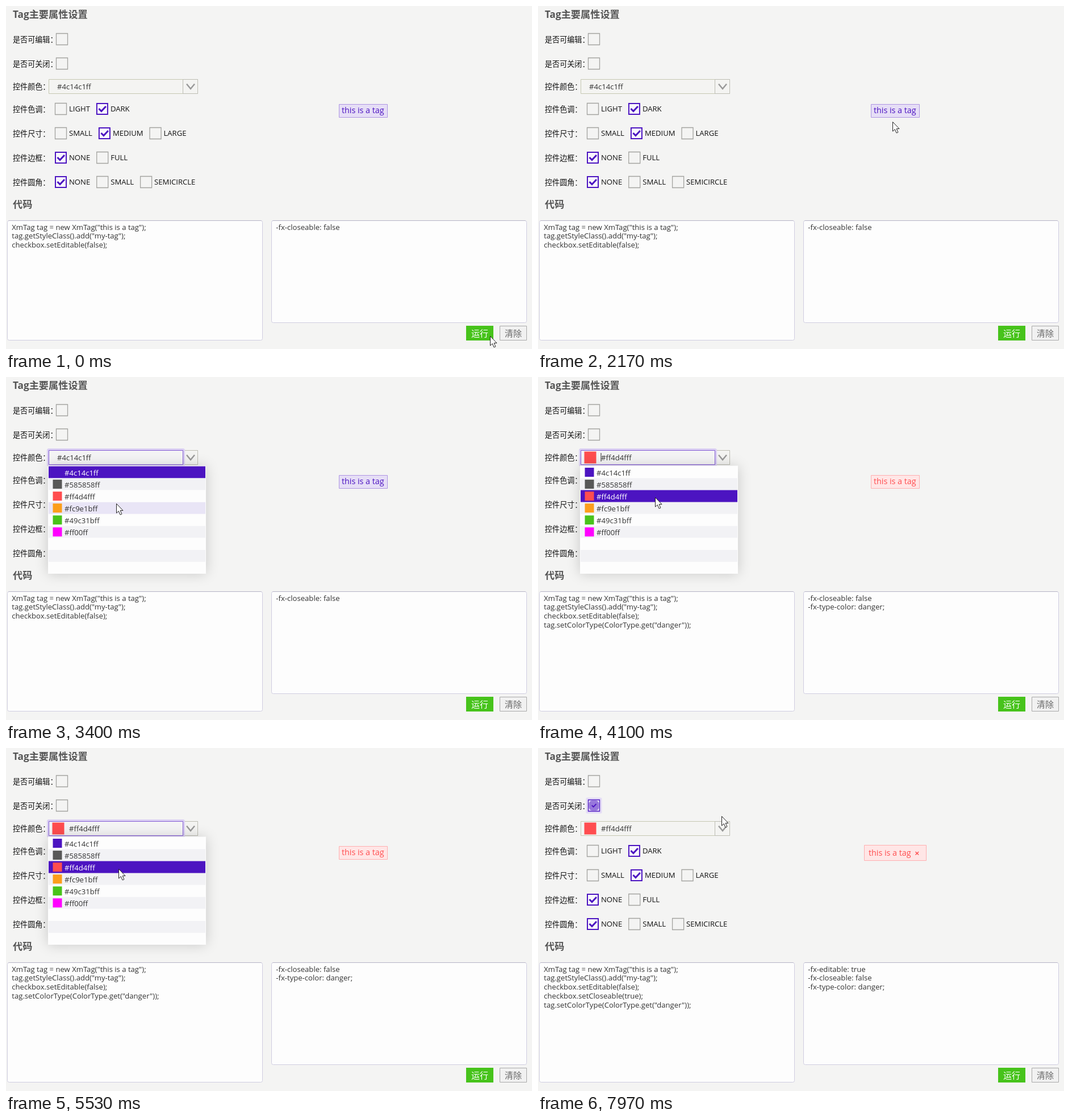
An HTML page with a canvas for the animation above (8000 ms loop, 926x605 px).

```html
<!DOCTYPE html>
<html lang="zh">
<head>
<meta charset="utf-8">
<style>
html, body { margin: 0; width: 100%; height: 100%; overflow: hidden; background: #f4f4f3; }
canvas { display: block; }
</style>
</head>
<body>
<canvas id="stage" width="926" height="605"></canvas>
<script>
const ctx = document.getElementById('stage').getContext('2d');
const FONT = '"Open Sans", "Noto Sans CJK SC", "Noto Sans CJK", sans-serif';
const LOOP = 8000, SIZE = 13.1, ROW = 43;
const PURPLE = '#4c14c1', GREY = '#a3a3a0';
const COLORS = ['#4c14c1ff', '#585858ff', '#ff4d4fff', '#fc9e1bff', '#49c31bff', '#ff00ff'];
const TYPES = { 2: 'danger', 3: 'warning' };

// Option groups: label, choices, index of the chosen one
const GROUPS = [
  ['控件色调：', ['LIGHT', 'DARK'], 1],
  ['控件尺寸：', ['SMALL', 'MEDIUM', 'LARGE'], 1],
  ['控件边框：', ['NONE', 'FULL'], 0],
  ['控件圆角：', ['NONE', 'SMALL', 'SEMICIRCLE'], 0]
];

// Moments of the user's actions, in ms
const FOCUS = 2700, OPEN = 2800, PICK = 3620, RETRY = 4350, BACK = 4800;
const CLOSE = 6350, BLUR = 7560, CHECK = 7830;

// Pointer moves: start and end in ms, then where it goes
const MOVES = [
  [30, 830, 640, 420], [870, 1200, 92, 48], [1470, 2030, 624, 204], [2200, 2800, 325, 140],
  [3000, 3400, 194, 223], [3440, 3700, 206, 212], [4150, 4340, 201, 231], [4600, 4780, 198, 213],
  [5700, 6450, 622, 194], [6650, 6980, 66, 115], [7000, 7330, 600, 204], [7370, 7600, 98, 101],
  [CHECK, 7970, 323, 120]
];

const progress = (t, a, b) => Math.min(1, Math.max(0, (t - a) / (b - a)));
const ease = k => k * k * (3 - 2 * k);

function pointerAt(t) {
  let x = 852, y = 582;
  for (const [a, b, u, v] of MOVES) {
    const k = ease(progress(t, a, b));
    x += (u - x) * k;
    y += (v - y) * k;
  }
  return [x, y];
}

function pickAt(t) {
  return t < PICK ? 0 : t >= RETRY && t < BACK ? 3 : 2;
}

// Draws text and returns its width
function text(s, x, y, color = '#111', size = SIZE, weight = 400) {
  ctx.font = `${weight} ${size}px ${FONT}`;
  ctx.fillStyle = color;
  ctx.fillText(s, x, y);
  return ctx.measureText(s).width;
}

function box(x, y, w, h, fill, stroke, line = 1, radius = 0) {
  ctx.beginPath();
  ctx.roundRect(x, y, w, h, radius);
  if (fill) { ctx.fillStyle = fill; ctx.fill(); }
  if (stroke) { ctx.strokeStyle = stroke; ctx.lineWidth = line; ctx.stroke(); }
}

function polyline(points, color, width) {
  ctx.beginPath();
  points.forEach(([x, y]) => ctx.lineTo(x, y));
  ctx.strokeStyle = color;
  ctx.lineWidth = width;
  ctx.stroke();
}

// Mix of a colour with white
function tint(color, part) {
  const mix = [1, 3, 5].map(i => 255 - (255 - parseInt(color.substr(i, 2), 16)) * part);
  return `rgb(${mix})`;
}

function tick(x, y, scale = 1) {
  const points = [[-6, -.5], [-1.5, 4], [6.5, -4.5]];
  polyline(points.map(([u, v]) => [x + u * scale, y + v * scale]), PURPLE, 3 * scale);
}

function checkbox(x, y, checked) {
  if (!checked) return box(x - 10, y - 10, 20, 20, null, GREY, 1.3);
  box(x - 9.5, y - 9.5, 19, 19, '#f8f6fc', PURPLE, 2);
  tick(x, y);
}

function group([label, choices, chosen], y) {
  text(label, 12, y + 5);
  let x = 96.5;
  choices.forEach((name, i) => {
    checkbox(x, y, i === chosen);
    x += 36 + text(name, x + 14.5, y + 4.7);
  });
}

function form() {
  text('Tag主要属性设置', 12, 21, '#555', 17.2, 700);
  text('代码', 12, 356, '#555', 17.2, 700);
  ['是否可编辑：', '是否可关闭：'].forEach((label, i) => text(label, 12, 63.5 + i * ROW));
  text('控件颜色：', 12, 147);
  checkbox(98.5, 58.5, false);
  GROUPS.forEach((g, i) => group(g, 181.5 + i * ROW));
  box(810, 564, 48, 26, '#47c31b');
  text('运行', 819, 583, '#fff', 15);
  box(869.5, 564.5, 47, 25, '#f1f1f1', '#a9a9a9');
  text('清除', 878, 583, '#666', 15);
}

function closeBox(t) {
  const x = 98.5, y = 58.5 + ROW;
  if (t >= BLUR) box(x - 14, y - 14, 28, 28, tint(PURPLE, .15), null, 1, 2);
  if (t < CHECK) return checkbox(x, y, false);
  const k = progress(t, CHECK, CHECK + 200);
  box(x - 10, y - 10, 20, 20, '#e6dff5', PURPLE, 1.3);
  ctx.beginPath();
  ctx.arc(x, y, 3 + 10 * k, 0, 7);
  ctx.save();
  ctx.clip();
  box(x - 9, y - 9, 18, 18, tint(PURPLE, .58));
  ctx.restore();
  tick(x, y, .2 + .6 * k);
}

function combo(t, pick) {
  const color = COLORS[pick], picked = t >= PICK, focused = t >= FOCUS && t < BLUR;
  box(75.5, 129.5, 262, 25, '#f4f4f2', '#c6c8b2');
  box(311.5, 129.5, 26, 25, null, '#bcbcb2');
  polyline([[318, 137.5], [325, 146], [332, 137.5]], '#999', 2.4);
  if (focused) {
    box(73.5, 127.5, 240, 29, null, tint(PURPLE, .2), 3, 2);
    box(75.5, 129.5, 236, 25, '#f4f4f5', tint(PURPLE, .7));
  }
  if (picked) box(81.5, 131.5, 21, 21, color);
  text(color, picked ? 111 : 90, 146.5, '#333');
  const caretOn = (t + 130) % 1000 < 500;
  if (focused && picked && caretOn) box(110.5, 134, 1, 15, '#222');
}

function popup(pick, [px, py]) {
  const x = 75, y = 157.5, w = 276, h = 189.5, rowH = h / 9;
  ctx.save();
  ctx.shadowColor = 'rgba(0,0,0,.18)';
  ctx.shadowBlur = 22;
  box(x - 1, y - 1, w + 2, h + 1, '#fdfdfd');
  ctx.restore();
  const hover = px > x && px < x + w ? Math.floor((py - y) / rowH) : -1;
  for (let i = 0; i < 9; i++) {
    const top = y + i * rowH, color = COLORS[i], chosen = i === pick;
    box(x, top, w, rowH, chosen ? PURPLE : color && i === hover ? '#e9e5f6' : i % 2 ? '#f2f2f5' : '#fdfdfd');
    if (!color) continue;
    box(82.5, top + 2.5, 16, 16, color);
    text(color, 103, top + 16, chosen ? '#fff' : '#333');
  }
}

function tag(color, closable) {
  const grow = closable ? 12 : 0, rise = closable ? 2 : 0;
  const x = 586.5 - grow, y = 173.5 - rise;
  box(x, y, 85 + 2 * grow, 23 + 2 * rise, tint(color, .14), tint(color, .45));
  text('this is a tag', closable ? 582 : 591, closable ? 190 : 189, color, 14.3);
  if (!closable) return;
  for (const d of [-2.8, 2.8]) polyline([[667.3 - d, 183], [667.3 + d, 188.6]], color, 1.4);
}

function area(x, h, lines) {
  box(x, 378.5, 449, h, '#fdfdfd', '#cfcde0', 1, 3);
  polyline([[x + 2, 378.5], [x + 447, 378.5]], '#b6b4c6', 1.2);
  lines.forEach((line, i) => text(line, x + 7.8, 394.5 + i * 15.8, '#333'));
}

function code(pick, closable) {
  const type = TYPES[pick];
  area(2.5, 211, [
    'XmTag tag = new XmTag("this is a tag");',
    'tag.getStyleClass().add("my-tag");',
    'checkbox.setEditable(false);',
    closable && 'checkbox.setCloseable(true);',
    type && `tag.setColorType(ColorType.get("${type}"));`
  ].filter(Boolean));
  area(467.5, 180, [
    closable && '-fx-editable: true',
    '-fx-closeable: false',
    type && `-fx-type-color: ${type};`
  ].filter(Boolean));
}

function pointer([x, y]) {
  ctx.save();
  ctx.translate(x + .5, y + .5);
  const arrow = new Path2D('M0 0V16.5L3.8 13L6.6 19.5L9.4 18.3L6.7 12H11.5Z');
  ctx.fillStyle = '#fff';
  ctx.fill(arrow);
  ctx.strokeStyle = '#222';
  ctx.lineWidth = 1;
  ctx.stroke(arrow);
  ctx.restore();
}

function draw(t) {
  const pick = pickAt(t), closable = t >= CHECK + 60, pos = pointerAt(t);
  box(0, 0, 926, 605, '#f4f4f3');
  form();
  closeBox(t);
  combo(t, pick);
  tag(COLORS[pick], closable);
  code(pick, closable);
  if (t >= OPEN && t < CLOSE) popup(pick, pos);
  pointer(pos);
}

const start = performance.now();
function frame() {
  draw((performance.now() - start) % LOOP);
  requestAnimationFrame(frame);
}
frame();
</script>
</body>
</html>
```
